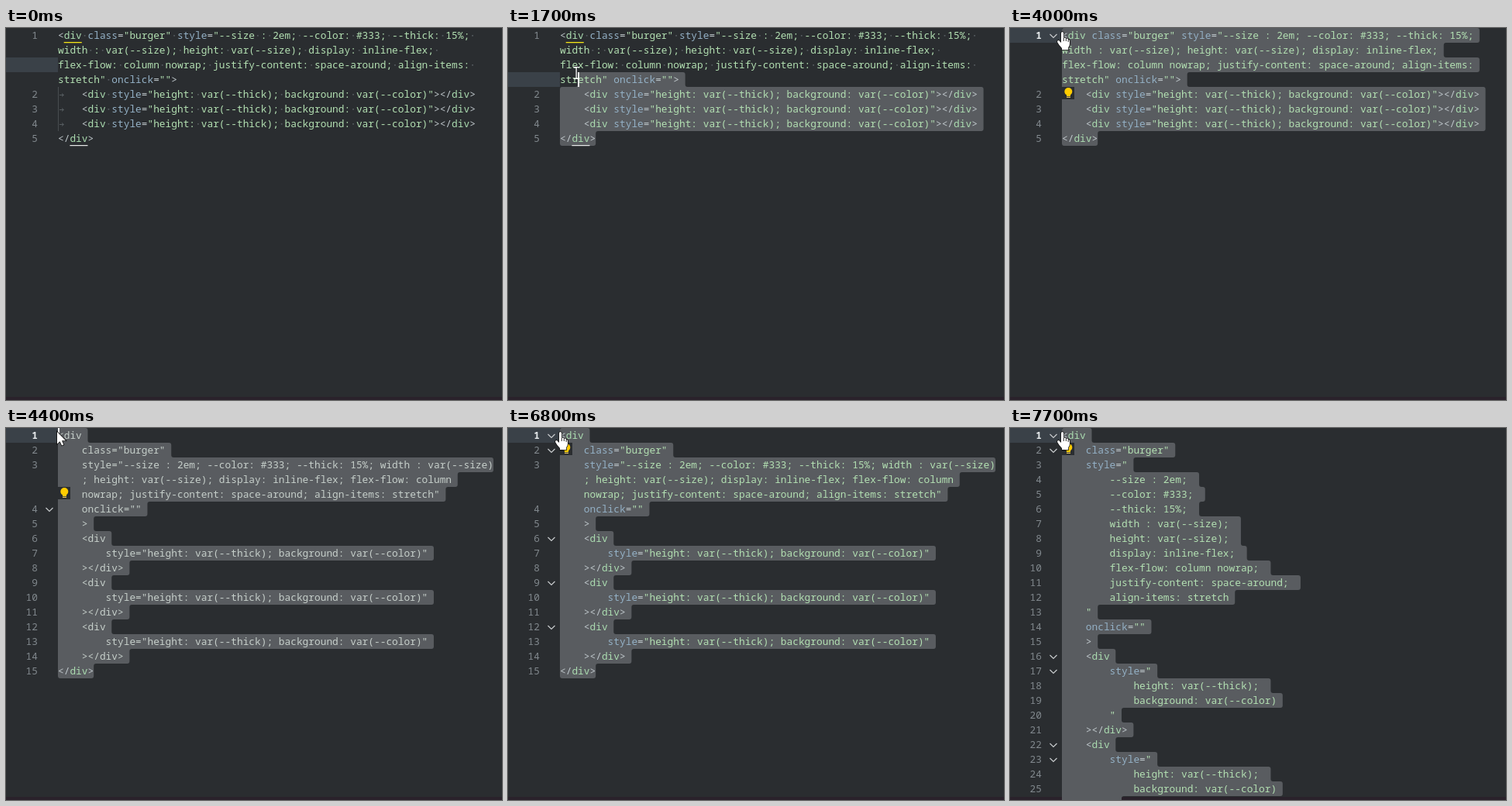
These frames come from a looping animation (640x480 px, 8 s). An HTML page with a canvas:

```html
<!DOCTYPE html>
<html lang="en">
<head>
<meta charset="utf-8">
<title>Reformatting a burger button</title>
<style>
  html, body { margin: 0; width: 100%; height: 100%; overflow: hidden; background: #2a2d30; }
  canvas { display: block; }
</style>
</head>
<body>
<canvas id="stage" width="640" height="480"></canvas>
<script>
const ctx = document.getElementById('stage').getContext('2d');
const LOOP = 8000, ROW = 19, LEFT = 67, CH = 7.698;
const FONT = '12.83px "Noto Sans Mono", "DejaVu Sans Mono", monospace';
const C = {
  bg: '#2a2d30', status: '#2a222b', line: '#3a4148', sel: '#595c60',
  punct: '#c0c8cc', tag: '#abdcb0', attr: '#94b1c6', str: '#b3e0b2', plain: '#c6cfca',
  num: '#81888d', dim: '#565c60', guide: '#484c50'
};

// A trailing ~ means the line wraps onto the next row.
const item = '    <div style="height: var(--thick); background: var(--color)"></div>';
const compact = [
  '<div class="burger" style="--size : 2em; --color: #333; --thick: 15%; ~',
  'width : var(--size); height: var(--size); display: inline-flex; ~',
  'flex-flow: column nowrap; justify-content: space-around; align-items: ~',
  'stretch" onclick="">', item, item, item, '</div>'
];

const split = [
  '    <div',
  '        style="height: var(--thick); background: var(--color)"',
  '    ></div>'
];
const attributes = [
  '<div', '    class="burger"',
  '    style="--size : 2em; --color: #333; --thick: 15%; width : var(--size)~',
  '    ; height: var(--size); display: inline-flex; flex-flow: column ~',
  '    nowrap; justify-content: space-around; align-items: stretch"',
  '    onclick=""', '    >', ...split, ...split, ...split, '</div>'
];

const rules = ['--size : 2em; ', '--color: #333; ', '--thick: 15%; ', 'width : var(--size); ',
  'height: var(--size); ', 'display: inline-flex; ', 'flex-flow: column nowrap; ',
  'justify-content: space-around; ', 'align-items: stretch'];
const block = ['    <div', '        style="', '            height: var(--thick); ',
  '            background: var(--color)', '        "', '    ></div>'];
const expanded = [
  '<div', '    class="burger"', '    style="', ...rules.map(r => ' '.repeat(8) + r),
  '    "', '    onclick=""', '    >', ...block, ...block, ...block, '</div>'
];

function parse(lines) {
  let inString = false, inTag = false, wrapped = false, n = 0;
  return lines.map(src => {
    const wraps = src.endsWith('~');
    const text = wraps ? src.slice(0, -1) : src;
    const colors = [...text].map(c => {
      if (c === '"') { inString = !inString; return C.str; }
      if (inString) return C.str;
      if (c === '<') inTag = true;
      else if (c === ' ' || c === '>') inTag = false;
      if ('<>/='.includes(c)) return C.punct;
      return inTag ? C.tag : C.attr;
    });
    if (!wrapped) inTag = false;
    const row = { text, colors, wraps, num: wrapped ? '' : String(++n) };
    wrapped = wraps;
    return row;
  });
}
const docs = [compact, attributes, expanded].map(parse);

// [time, document, coloured, fold rows, bulb row, pointer]
const scenes = [
  [0, 0, true, [], -1, 'beam'],
  [2900, 0, true, [], 4, 'beam'],
  [3200, 0, true, [0], 4, 'hand'],
  [4400, 1, false, [5], 4, 'arrow'],
  [4600, 1, true, [5], 4, 'arrow'],
  [4700, 1, true, [0, 1, 7, 10, 13], 1, 'hand'],
  [7200, 2, false, [], 1, 'arrow'],
  [7300, 2, true, [], 1, 'arrow'],
  [7400, 2, true, [0, 1, 15, 16, 21, 22], 1, 'hand']
];
const blinks = [3100, 3600, 4000, 4400, 4900, 5400, 5800, 6300, 6800, 7200, 7700];
// Pointer stops: time, x, y
const path = [
  [300, 4, 155], [400, 40, 118], [500, 78, 80], [600, 112, 46], [700, 140, 20],
  [800, 162, 14], [900, 171, 22], [1000, 160, 36], [1100, 145, 46], [1300, 209, 151],
  [1500, 185, 141], [1600, 132, 98], [1700, 88, 58], [1800, 78, 42], [1900, 70, 32],
  [2000, 66, 23], [2200, 66, 21], [2400, 65, 19], [2500, 65, 17], [2600, 65, 13],
  [3100, 65, 9], [3200, 66, 7], [3400, 66, 5]
];
const latest = (list, t) => list.filter(k => k[0] <= t).pop();

const colX = c => LEFT + c * CH;
const handShape = new Path2D('M0 2Q0 0 1.5 0T3.2 2V8Q5.3 6.8 6.3 9Q8.3 7.8 9.2 10Q11 9.4 11 12V15Q11 18 9.2 20V23H1V21Q-3 17-5 13Q-5 10.6-3 11L0 14Z');
const knuckles = new Path2D('M3.2 8V12M6.3 9V12M9.2 10V13');
const arrowShape = new Path2D('M0 0V15.5L3.6 12.2L6 17.5L8.3 16.5L6 11.3H11Z');

function box(color, x, y, w, h) {
  ctx.fillStyle = color;
  ctx.fillRect(x, y, w, h);
}

function text(str, x, row, color, bold) {
  ctx.font = (bold ? 'bold ' : '') + FONT;
  ctx.fillStyle = color;
  ctx.fillText(str, x, row * ROW + 14);
}

function strokePts(pts, color, width) {
  ctx.beginPath();
  for (const [x, y] of pts) ctx.lineTo(x, y);
  ctx.strokeStyle = color;
  ctx.lineWidth = width;
  ctx.stroke();
}

function selection(doc, from, col) {
  const last = doc.length - 1;
  if (from === last && col >= doc[last].text.length) return;
  const left = colX(col), pts = [[left, from * ROW]];
  let prev = null;
  for (let r = from; r <= last; r++) {
    const extra = doc[r].wraps || r === last ? 0 : 1;
    const right = colX(doc[r].text.length + extra);
    if (right !== prev) {
      if (prev !== null) pts.push([prev, r * ROW]);
      pts.push([right, r * ROW]);
    }
    prev = right;
  }
  const bottom = (last + 1) * ROW;
  pts.push([prev, bottom]);
  if (from === last) pts.push([left, bottom]);
  else {
    pts.push([LEFT, bottom]);
    if (col) pts.push([LEFT, (from + 1) * ROW], [left, (from + 1) * ROW]);
  }
  ctx.beginPath();
  ctx.moveTo(left + 4, from * ROW);
  for (let i = 1; i <= pts.length; i++) {
    const a = pts[i % pts.length], b = pts[(i + 1) % pts.length];
    ctx.arcTo(a[0], a[1], b[0], b[1], 3);
  }
  ctx.closePath();
  ctx.fillStyle = C.sel;
  ctx.fill();
}

function drawRow(row, r, coloured, selected) {
  const indent = row.text.search(/\S/);
  const tab = indent > 0 && !selected(r, 0);
  if (tab) {
    const y = r * ROW + 10.5;
    box(C.guide, LEFT, r * ROW, 1, ROW);
    strokePts([[69, y], [74, y]], C.dim, 1);
    strokePts([[72, y - 2], [74.5, y], [72, y + 2]], C.dim, 1);
  }
  [...row.text].forEach((c, i) => {
    if (c !== ' ') text(c, colX(i), r, coloured ? row.colors[i] : C.plain);
    else if (i >= indent && !selected(r, i)) box(C.dim, colX(i) + 3, r * ROW + 9, 1.7, 1.7);
  });
}

function bulb(r) {
  const y = r * ROW;
  box(C.bg, LEFT, y, 16, 16);
  ctx.fillStyle = '#ffcc00';
  ctx.beginPath();
  ctx.arc(75.3, y + 6, 5, 0, 7);
  ctx.fill();
  ctx.fillRect(73, y + 9, 5, 3);
  box('#e0c060', 73, y + 12.7, 5, 1.3);
}

function pointer(kind, x, y) {
  if (kind === 'beam') {
    box('#fff', x - 0.5, y - 7, 1.3, 14);
    box('#fff', x - 3.5, y - 8, 7.3, 1.2);
    box('#fff', x - 3.5, y + 6.8, 7.3, 1.2);
    return;
  }
  ctx.save();
  ctx.translate(x, y);
  const shape = kind === 'hand' ? handShape : arrowShape;
  ctx.strokeStyle = '#111';
  ctx.lineWidth = 1.6;
  ctx.stroke(shape);
  ctx.fillStyle = '#fff';
  ctx.fill(shape);
  if (kind === 'hand') {
    ctx.lineWidth = 0.9;
    ctx.stroke(knuckles);
  }
  ctx.restore();
}

function draw(t) {
  const [, id, coloured, folds, bulbRow, kind] = latest(scenes, t);
  const doc = docs[id], pos = latest(path, t), dragged = t >= 1500;
  let row = 2, col = 0;
  if (dragged) {
    row = Math.floor((pos[2] + 2) / ROW);
    col = Math.max(0, Math.round((pos[1] - LEFT) / CH));
    col = Math.min(col, doc[row].text.length);
  }
  const selected = (r, c) => dragged && (r > row || (r === row && c >= col));

  box(C.bg, 0, 0, 640, 480);
  box(C.status, 0, 476, 640, 4);
  box(C.line, 0, row * ROW, LEFT, ROW);
  if (dragged) selection(doc, row, col);

  doc.forEach((line, r) => {
    if (r > 25) return;
    const active = r === 0 && row === 0;
    text(line.num, 41 - line.num.length * CH, r, active ? '#e4e8ea' : C.num, active);
    drawRow(line, r, coloured || r === doc.length - 1, selected);
  });
  if (t < 2600) {
    box('#f5e616', colX(1), 18, 3 * CH, 1.3);
    box('#e8eaea', colX(2), 151, 3 * CH, 1.2);
  }
  for (const r of folds) {
    const y = r * ROW + 8;
    strokePts([[51.5, y], [56, y + 4.5], [60.5, y]], t < 3600 ? '#8d9195' : '#c8cbcd', 1.2);
  }
  if (bulbRow >= 0) bulb(bulbRow);

  const on = blinks.filter(b => b <= t).length % 2 === 0;
  if (dragged && on) box('#f4f4f4', Math.round(colX(col)), row * ROW, 2, ROW);
  if (pos) pointer(pos[1] < 60 ? 'arrow' : kind, pos[1], pos[2]);
}

function frame() {
  draw(performance.now() % LOOP);
  requestAnimationFrame(frame);
}
frame();
</script>
</body>
</html>
```
